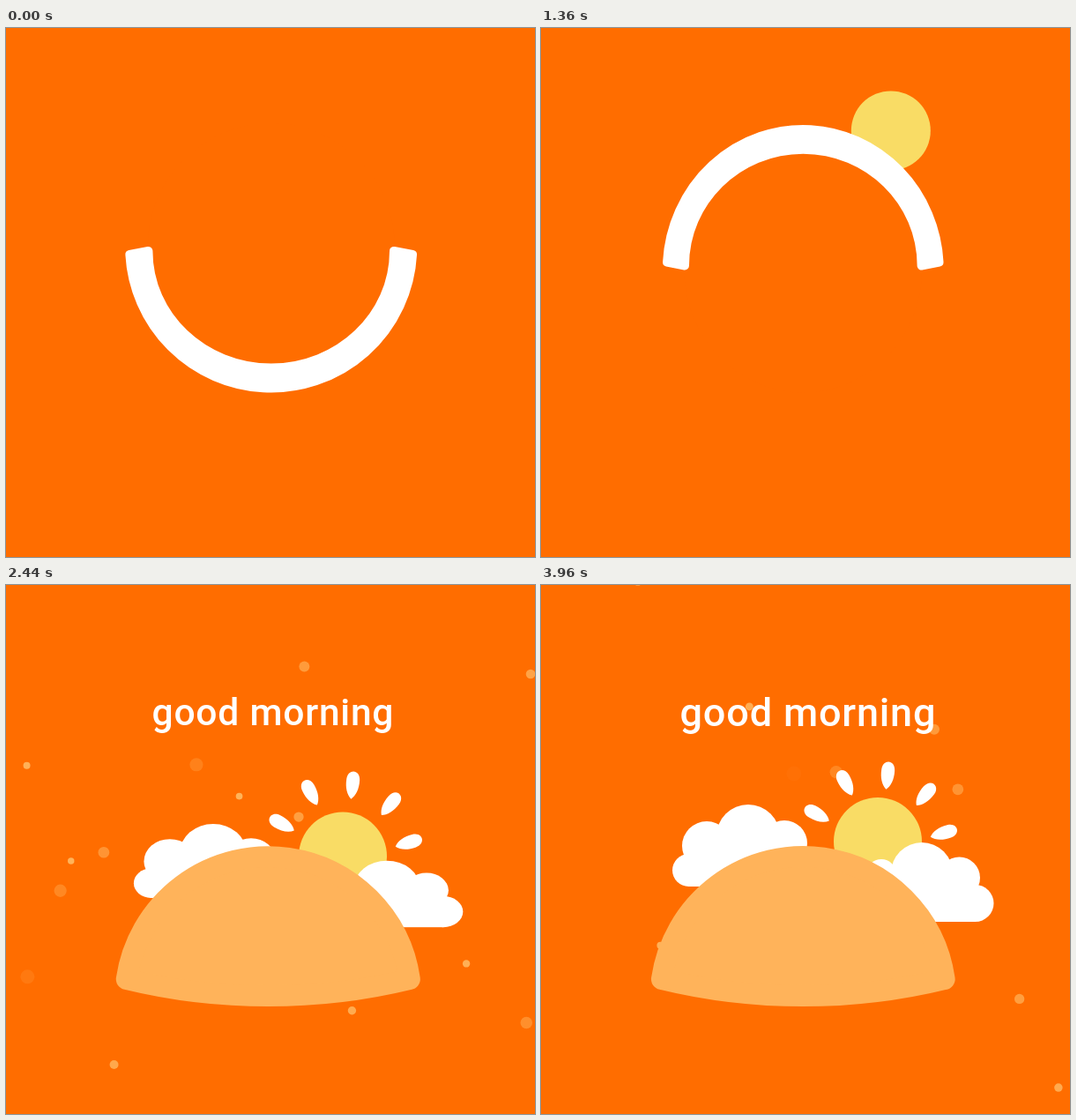
Write an HTML page with a canvas that moves like this. It is 600 px wide and 600 px high and loops after 4 s.

```html
<!DOCTYPE html>
<html lang="en">
<head>
<meta charset="utf-8">
<title>Good morning</title>
<style>
  html, body { margin: 0; width: 100%; height: 100%; overflow: hidden; background: #ff6d00; }
  canvas { display: block; width: 600px; height: 600px; }
</style>
</head>
<body>
<canvas id="stage" width="600" height="600"></canvas>
<script>
const ctx = document.getElementById('stage').getContext('2d');
const LOOP = 4000, STEP = 40;
const BG = '#ff6d00', YELLOW = '#f9dc65', PEACH = [255, 179, 90];
const PIVOT = { x: 299, y: 261.2 }, GRAVITY = .001;

const { PI, sin, cos, exp, max, min } = Math;
const clamp = v => max(0, min(1, v));
const mix = (a, b, k) => a + (b - a) * k;
const span = (t, from, to) => clamp((t - from) / (to - from));
const sineInOut = k => (1 - cos(PI * k)) / 2;
const quadOut = k => k * (2 - k);
const fall = (t, from) => GRAVITY * max(0, t - from) ** 2;

// Shared timing of the scene that opens behind the hill
const settle = t => quadOut(span(t, 2280, 2620));
const grow = t => span(t, 2240, 2400);

function disc(x, y, r, color) {
  ctx.fillStyle = color;
  ctx.beginPath();
  ctx.arc(x, y, r, 0, 2 * PI);
  ctx.fill();
}

function placed(x, y, sx, sy, angle, draw) {
  ctx.save();
  ctx.translate(x, y);
  ctx.rotate(angle);
  ctx.scale(sx, sy);
  draw();
  ctx.restore();
}

// Dots born at a steady rate: each rises, swells and fades
function makeDots(count, seed) {
  const rand = () => (seed = seed * 16807 % 2147483647) / 2147483647;
  return Array.from({ length: count }, (_, i) => ({
    born: 1400 + i * 72, x: 600 * rand(), y: 90 + 600 * rand(), drift: 20 * (rand() - .6)
  }));
}
const dots = makeDots(36, 4211);

function drawDots(t) {
  for (const d of dots) {
    const p = (t - d.born) / 1150;
    if (p < 0 || p > 1) continue;
    ctx.globalAlpha = 1 - p * p;
    disc(d.x + d.drift * p, d.y - 209 * p, 3.7 + 5 * p ** 1.5, `rgb(${PEACH})`);
  }
  ctx.globalAlpha = 1;
}

// A band that turns over, drops, and fills into the hill
function drawDome(t) {
  const turn = span(t, 800, 1320), m = sineInOut(span(t, 1960, 2150));
  const drop = min(195.5, fall(t, 1672));
  const speed = drop < 195.5 ? 2 * GRAVITY * max(0, t - 1672) : 0;
  const landed = max(0, t - 2114);
  const wobble = .05 * exp(-landed / 90) * sin(landed / 45);
  const sx = mix(mix(1, .963, clamp(turn * 3)) - .04 * speed, 1, m) + wobble;
  const sy = mix(mix(1, .994, turn) + .06 * speed, 1, m) - wobble;

  const r = mix(160.6, 162, m), end = mix(-9, -23, m), corner = mix(5, 12, m);
  const w = mix(139.3, 160, m), y = mix(-5, -23, m), h = mix(-132.6, 19, m);
  const ax = w * mix(1, .66, m), ay = y + h * mix(.552, .7, m), bx = w * mix(.552, .33, m);
  const a = Math.asin(end / r);

  ctx.save();
  ctx.translate(PIVOT.x, PIVOT.y + 3 * sin(PI * turn) + drop);
  ctx.rotate(PI * (1 - sineInOut(turn)));
  ctx.translate(-1.7, 13.3);
  ctx.scale(sx, sy);
  if (t < 1400) disc(0, 0, 140, BG);
  ctx.fillStyle = ctx.strokeStyle = `rgb(${PEACH.map(v => Math.round(mix(255, v, m)))})`;
  ctx.lineWidth = 2 * corner;
  ctx.lineJoin = 'round';
  ctx.beginPath();
  ctx.arc(0, 0, r, PI - a, 2 * PI + a);
  ctx.lineTo(w, y);
  ctx.bezierCurveTo(ax, ay, bx, y + h, 0, y + h);
  ctx.bezierCurveTo(-bx, y + h, -ax, ay, -w, y);
  ctx.closePath();
  ctx.fill();
  ctx.stroke();
  ctx.restore();
}

// Pops out, swings round the pivot, drops, then rises behind the hill
function drawSun(t) {
  const pop = span(t, 160, 640), swing = sineInOut(span(t, 890, 1400));
  const angle = mix(45, -57.5, swing) * PI / 180;
  const dist = 158 + 66 * sin(PI * pop) + 17 * swing;
  let x = PIVOT.x + dist * cos(angle), y = PIVOT.y + dist * sin(angle);
  if (t >= 1400) {
    x = mix(mix(x, 373, span(t, 1400, 1920)), 382, span(t, 1920, 2280));
    y = mix(min(350, 114 + fall(t, 1790)), 291, settle(t));
  }
  disc(x, y, 45 * quadOut(clamp(pop * 3)) + 5 * span(t, 1960, 2280), YELLOW);
}

function drawRays(t) {
  const s = grow(t), cy = 291 + 39 * (1 - settle(t));
  ctx.fillStyle = '#fff';
  for (let i = -2; i <= 2; i++) {
    const at = (-81 + 38 * i) * PI / 180, lean = (-84 + 33.5 * i) * PI / 180;
    placed(382 + 60 * cos(at), cy + 60 * sin(at), s, s, lean, () => {
      ctx.beginPath();
      ctx.moveTo(0, 0);
      ctx.bezierCurveTo(4, -5, 12, -8, 22, -7.5);
      ctx.bezierCurveTo(34.5, -7, 34.5, 7, 22, 7.5);
      ctx.bezierCurveTo(12, 8, 4, 5, 0, 0);
      ctx.fill();
    });
  }
}

// Lobes are [x, y, radius] around the middle of the flat base
function drawCloud(t, x, base, squash, lobes) {
  const q = 1 - settle(t), s = grow(t);
  placed(x, base + squash.drop * q, s * (1 + squash.wide * q), s * (1 - squash.flat * q), 0, () => {
    for (const [cx, cy, r] of lobes) disc(cx, cy, r, '#fff');
    const first = lobes[0], last = lobes[lobes.length - 1];
    ctx.fillRect(first[0], -42, last[0] - first[0], 42);
  });
}

function drawText(t) {
  const s = grow(t) * (1 - .196 * (1 - settle(t)));
  placed(302.5, 147, s, s, 0, () => {
    ctx.font = '500 45px Roboto, sans-serif';
    ctx.letterSpacing = '0.8px';
    ctx.textAlign = 'center';
    ctx.fillStyle = '#fff';
    ctx.fillText('good morning', 0.4, 12.5);
  });
}

function draw(t) {
  ctx.fillStyle = BG;
  ctx.fillRect(0, 0, 600, 600);
  if (t >= 2000) drawDots(t);
  if (t > 2240) drawRays(t);
  drawSun(t);
  if (t > 2240) {
    drawCloud(t, 235, 342, { drop: 46, wide: .17, flat: .35 },
      [[-67.5, -18.5, 18.5], [-47, -46, 28], [0, -57, 36], [41, -49, 26]]);
    drawCloud(t, 432, 382, { drop: 22, wide: .21, flat: .58 },
      [[-46, -54, 17], [0, -55, 35], [42.5, -50, 23.5], [60.5, -21, 21]]);
    drawText(t);
  }
  drawDome(t);
}

const start = performance.now();
function tick() {
  const t = (performance.now() - start) % LOOP;
  draw(Math.floor(t / STEP) * STEP);
  requestAnimationFrame(tick);
}
tick();
</script>
</body>
</html>
```
